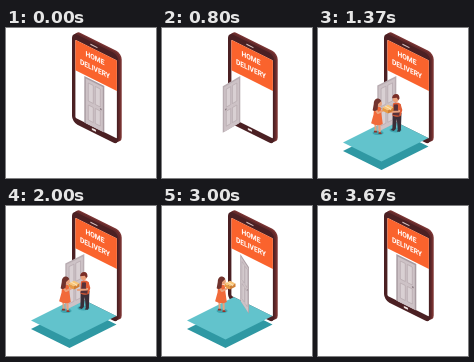
An HTML page for the animation above (3.86 s loop, 150x150 px).

```html
<!DOCTYPE html>
<html lang="en">
<head>
<meta charset="utf-8">
<title>Home delivery</title>
<style>
  html, body { margin: 0; width: 100%; height: 100%; overflow: hidden; background: #fff; }
  svg { display: block; width: 100%; height: 100%; }
  text { font: 700 7.5px Roboto, Arial, sans-serif; fill: #fff; text-anchor: middle; }
</style>
</head>
<body>
<svg viewBox="0 0 150 150">
  <!-- phone, drawn flat and projected onto the wall plane -->
  <g transform="matrix(.894 .447 0 1 66 4)">
    <rect x="3.600" y="-3.400" width="52" height="90" rx="6" fill="#7c3534"/>
    <rect x="2" y="-2" width="52" height="90" rx="6" fill="#652a2b"/>
    <rect width="52" height="90" rx="6" fill="#4b2023"/>
    <rect x="3.800" y="6" width="46.400" height="78" rx="1" fill="#fff"/>
    <path d="M3.800 7q0-1 1-1h44.400q1 0 1 1v29.500H3.800z" fill="#fa632d"/>
    <path d="M21 3h7" stroke="#d9c5c3" stroke-width="1.100" stroke-linecap="round"/>
    <path d="M23 87h3" stroke="#efe4e2" stroke-width="2" stroke-linecap="round"/>
    <text x="25.700" y="17.200">HOME</text>
    <text x="25.700" y="28">DELIVERY</text>
  </g>

  <g id="slab">
    <path id="slabLower" fill="#2f98a3"/>
    <path id="slabUpper" fill="#62c3cc"/>
  </g>

  <g id="door">
    <rect id="leaf" width="20" height="46.500"/>
    <rect x="1.500" y="1.800" width="17" height="44.700" fill="#cdc2c6"/>
    <g fill="#d9d0d3" stroke="#b3a6ab" stroke-width=".6">
      <rect x="4" y="5" width="5" height="18"/>
      <rect x="11" y="5" width="5" height="18"/>
      <rect x="4" y="27" width="5" height="15"/>
      <rect x="11" y="27" width="5" height="15"/>
    </g>
    <circle cx="16.500" cy="25" r=".9" fill="#85767c"/>
  </g>

  <g id="courier">
    <g transform="translate(-1 1.500)">
      <ellipse cx="78.500" cy="100.500" rx="6" ry="2.400" fill="#3fa5b0"/>
      <path d="M75.800 84l-.4 15-1.600 1.600 3 .8 2-1.800 1-10 1 11-1 1.300 3 .4 1.100-1.700.6-17z" fill="#3a2e38"/>
      <path d="M76 74q4-2 7.600.4l1.700 6-1.600 6q-4 1.800-8.200-.4z" fill="#e25c35"/>
      <path d="M77 75l-1.300 10.500 6.600.7.800-7-2.700-4.500z" fill="#57323a"/>
      <path d="M82.500 76l-.4 6-10 .5" fill="none" stroke="#eaa17c" stroke-width="1.900" stroke-linejoin="round"/>
      <path d="M82.500 75l-.2 5.500" stroke="#e25c35" stroke-width="2.800"/>
      <circle cx="78.700" cy="69.800" r="2.900" fill="#eaa17c"/>
      <path d="M75 68.800q.6-4.300 4.200-4.300 3.500.2 3.300 4.800l-1.400 1.200-1.200-2.200z" fill="#7a2e27"/>
    </g>
  </g>

  <g id="woman">
    <g transform="translate(-7.600 -10.600) scale(1.100)">
      <ellipse cx="61.500" cy="105" rx="5" ry="2" fill="#3fa5b0"/>
      <path d="M59 94l.3 9M62.800 94l.2 11" stroke="#eaa17c" stroke-width="1.800"/>
      <path d="M57.800 103h2.400l.6 1.600h-3zM62 104.500h2.200l.7 1.500h-3z" fill="#8c352c"/>
      <path d="M58 82q3-2 6 0l.6 6 1.200 9q-5 2.500-10.600-.7l2.200-8z" fill="#f16a3a"/>
      <path d="M58.600 83l2.800 4 6.600-3.300" fill="none" stroke="#eaa17c" stroke-width="1.800" stroke-linejoin="round"/>
      <circle cx="62.300" cy="78.200" r="2.700" fill="#eaa17c"/>
      <path d="M64.500 76q-1.200-3-4-2.200-3 1-2.900 5l-1 5.500q2.700 1.800 4.500-.5l.4-5z" fill="#71332d"/>
    </g>
  </g>

  <g id="parcel">
    <path d="M64.500 79.500l5.500 2.700v3.300l-5.500-2.700z" fill="#e79a45"/>
    <path d="M70 82.200l5.500-2.700v3.300l-5.500 2.700z" fill="#d07e34"/>
    <path d="M70 76.800l5.500 2.700-5.500 2.700-5.500-2.700z" fill="#f9c577"/>
    <path d="M67.200 78.200l5.500 2.700v1.300" fill="none" stroke="#fff0cf" stroke-width=".8"/>
  </g>
</svg>
<script>
const LOOP = 3860;
const part = id => document.getElementById(id);
const set = (id, name, value) => part(id).setAttribute(name, value);
const poly = points => "M" + points.map(p => p.join(" ")).join("L") + "z";

function ramp(t, from, to) {
  const p = Math.min(1, Math.max(0, (t - from) / (to - from)));
  return p * p * (3 - 2 * p);
}
const pulse = (t, a, b, c, d) => ramp(t, a, b) - ramp(t, c, d);

function place(id, x, y, opacity) {
  set(id, "transform", `translate(${x} ${y})`);
  set(id, "opacity", opacity);
}

function drawDoor(open) {
  const angle = open * Math.PI / 2;
  const c = Math.cos(angle), s = Math.sin(angle);
  set("door", "transform", `matrix(${c - .95 * s} ${(c + .95 * s) / 2} 0 1 78.300 48)`);
  set("leaf", "fill", open > .5 ? "#b9adb2" : "#a99ca2");
}

// Two stacked sheets slide out of the foot of the screen, down and to the left.
function drawSlab(out) {
  const reach = 47 * out, gap = 8.5 * Math.min(1, out * 4);
  const back = [72, 91], right = [110.500, 110];
  const slide = ([x, y]) => [x - reach, y + reach / 2];
  const drop = ([x, y]) => [x, y + gap];
  const sheet = [back, right, slide(right), slide(back)];
  set("slab", "display", out > 0 ? "inline" : "none");
  set("slabUpper", "d", poly(sheet));
  set("slabLower", "d", poly(sheet.map(drop)));
}

function draw(t) {
  drawDoor(pulse(t, 470, 850, 2750, 3150));
  drawSlab(pulse(t, 880, 1230, 3290, 3650));

  const arrive = ramp(t, 1050, 1330), leave = ramp(t, 2150, 2600);
  const away = 1 - arrive + leave;
  place("courier", 10 * away, -5 * away, arrive * (1 - leave));

  const woman = pulse(t, 1100, 1350, 3180, 3270);
  place("woman", 0, 0, woman);

  const handed = ramp(t, 1540, 1980);
  place("parcel", 10 * (1 - arrive) - 2 * handed, -5 * (1 - arrive) - 2 * handed,
        t < 2100 ? arrive : woman);
}

const start = performance.now();
function tick() {
  draw((performance.now() - start) % LOOP);
  requestAnimationFrame(tick);
}
draw(0);
requestAnimationFrame(tick);
</script>
</body>
</html>
```
